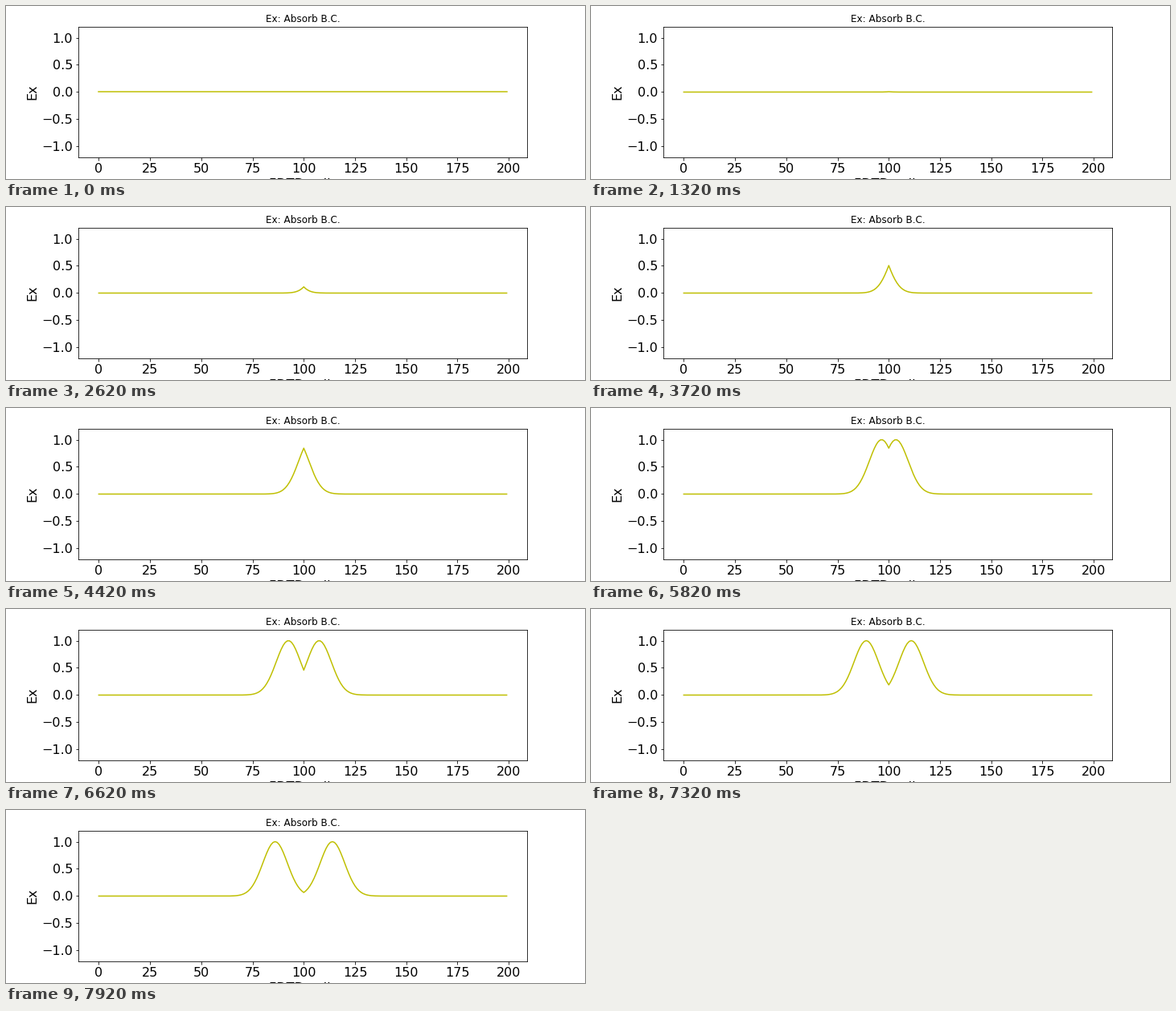
Recreate the animation shown at these times as a matplotlib script. Size 720x216 px, loop 8000 ms.

```python
import numpy as np
import matplotlib.pyplot as plt
from matplotlib.animation import FuncAnimation

CELLS, CENTER = 200, 100
T0, SPREAD = 50, 12          # Gaussian pulse, in time steps
LOOP, INTERVAL = 8000, 20    # ms
STEP, DELAY = 100, 120       # ms per time step, time of step 0


def simulate(steps):
    """1D FDTD in free space with a hard Gaussian source and absorbing ends."""
    ex, hy = np.zeros(CELLS), np.zeros(CELLS)
    low, high = [0.0, 0.0], [0.0, 0.0]
    fields = [ex.copy()]
    for n in range(1, steps + 1):
        ex[1:] += 0.5 * (hy[:-1] - hy[1:])
        ex[CENTER] = np.exp(-0.5 * ((T0 - n) / SPREAD) ** 2)
        ex[0], ex[-1] = low.pop(0), high.pop(0)
        low.append(ex[1])
        high.append(ex[-2])
        hy[:-1] += 0.5 * (ex[:-1] - ex[1:])
        fields.append(ex.copy())
    return fields


fields = simulate((LOOP - DELAY) // STEP)

plt.rcParams.update({"font.family": "DejaVu Sans", "font.size": 16})
fig = plt.figure(figsize=(10, 3), dpi=72, facecolor="white")
fig.subplots_adjust(left=0.125, right=0.9, bottom=0.125, top=0.88)
ax = fig.add_subplot()
ax.set_title("Ex: Absorb B.C.", fontsize=12)
ax.set_xlabel("FDTD cells")
ax.set_ylabel("Ex")
line, = ax.plot(np.arange(CELLS), fields[0], color="y", lw=1.5)
margin = 0.05 * (CELLS - 1)
ax.set_xlim(-margin, CELLS - 1 + margin)
ax.set_ylim(-1.2, 1.2)
ax.set_xticks(range(0, 201, 25))
ax.set_yticks(np.arange(-1, 1.5, 0.5))


def update(frame):
    step = max(0, (frame * INTERVAL - DELAY) // STEP)
    line.set_ydata(fields[step])
    return line,


anim = FuncAnimation(fig, update, frames=LOOP // INTERVAL, interval=INTERVAL,
                     init_func=lambda: update(0), blit=True,
                     repeat=True, repeat_delay=0)
plt.show()
```
